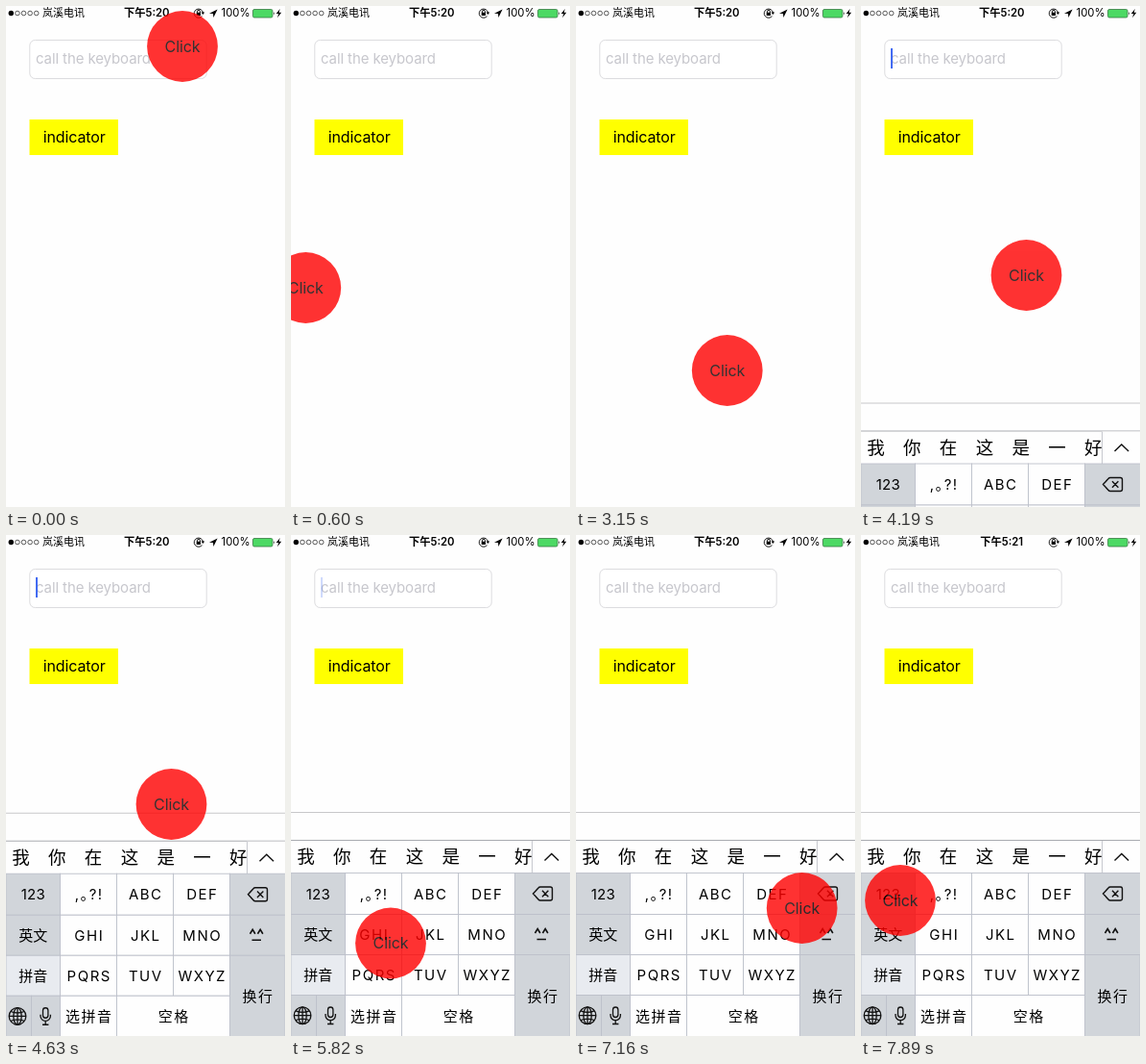
Write an HTML page that moves like this. It is 291x521 px and loops after 8000 ms.

```html
<!DOCTYPE html>
<html lang="zh-CN">
<head>
<meta charset="utf-8">
<title>Floating button</title>
<style>
html, body { margin: 0; width: 100%; height: 100%; overflow: hidden; background: #fefefe; }
svg { display: block; width: 291px; height: 521px; }
text { font-family: Inter, "Noto Sans CJK SC", "Noto Sans CJK", sans-serif; }
.icon { fill: none; stroke: #111; stroke-width: 1.4; }
.mid text { text-anchor: middle; }
</style>
</head>
<body>
<svg viewBox="0 0 291 521">
  <rect width="291" height="521" fill="#fefefe"/>

  <g id="status" font-size="11">
    <circle cx="5.3" cy="7.5" r="2.7"/>
    <text x="38" y="11.3">岚溪电讯</text>
    <text id="clock" x="146.7" y="11.3" font-size="11.3" font-weight="600" text-anchor="middle"></text>
    <path class="icon" style="stroke-width:1" d="M204.4 10.6A4.6 4.6 0 1 1 205.4 7M199.4 7V5.8a1.5 1.5 0 0 1 3 0V7"/>
    <path d="M198.7 6.8h4.2v3.2h-4.2zM203.6 6.6h3.6l-1.8 2.3zM212 7.8l8.6-4.3-4.2 8.6-.4-4.1z"/>
    <text x="254.5" y="11.4" font-size="11.3" text-anchor="end">100%</text>
    <rect x="257.5" y="3.5" width="20.5" height="8.5" rx="1.5" fill="#4cd964" stroke="#397a45" stroke-width=".8"/>
    <path d="M279 6q1.5 1.7 0 3.5zM285.8 3l-4 5h2.6l-1.4 4.2 4.3-5.4h-2.6z"/>
  </g>

  <rect x="24.8" y="35.5" width="184.4" height="40" rx="5.5" fill="#fff" stroke="#dcdcdf"/>
  <text x="31" y="60" font-size="15" letter-spacing="-.1" fill="#c7c7cd">call the keyboard</text>
  <rect id="caret" x="31" y="44" width="2" height="21" fill="#426bf2"/>
  <rect x="24.5" y="118" width="92.5" height="37" fill="#ff0"/>
  <text x="71.2" y="142" font-size="16" letter-spacing="-.1" text-anchor="middle">indicator</text>

  <g id="keyboard">
    <rect y="288" width="291" height="233" fill="#fefefe"/>
    <path d="M0 288.5H291" stroke="#c8c8ca"/>
    <path d="M0 317.5H291" stroke="#a9abb0"/>
    <g id="words" class="mid" font-size="18.5"></g>
    <rect x="251" y="318" width="40" height="34" fill="#fefefe"/>
    <path d="M251.5 318V352" stroke="#c6c8ce"/>
    <path class="icon" d="M264.5 338.5l7.3-7 7.3 7"/>
    <g id="keys" class="mid" font-size="15"></g>
    <path class="icon" d="M252.5 373l5.5-6q.8-1 2-1h10.5q2 0 2 2v10q0 2-2 2H260q-1.2 0-2-1zM262 369.8l6.4 6.4m0-6.4l-6.4 6.4"/>
    <path class="icon" style="stroke-width:1.6" d="M254.5 414l2.7-4.5 2.7 4.5m2.6 0l2.7-4.5 2.7 4.5M256.5 420.5h9.5"/>
    <g class="icon" style="stroke-width:1.3">
      <circle cx="12" cy="499.7" r="8.8"/>
      <ellipse cx="12" cy="499.7" rx="4.2" ry="8.8"/>
      <path d="M12 491V508.500M3.200 499.700H20.800M5 494.800q7 3 14 0M5 504.600q7-3 14 0"/>
      <rect x="38.5" y="491" width="5.4" height="10.5" rx="2.7"/>
      <path d="M36 498v1.500a5.200 5.200 0 0 0 10.400 0V498M41.200 505v3.500m-3.200 0h6.400"/>
    </g>
  </g>

  <g id="button" opacity=".8">
    <circle r="36.900" fill="red"/>
    <text y="5.700" font-size="16" letter-spacing="-.1" text-anchor="middle">Click</text>
  </g>
</svg>
<script>
const $ = id => document.getElementById(id);

function add(parent, tag, attrs, text = "") {
  const el = document.createElementNS("http://www.w3.org/2000/svg", tag);
  for (const name in attrs) el.setAttribute(name, attrs[name]);
  el.textContent = text;
  parent.append(el);
}

for (let i = 1; i < 5; i++)
  add($("status"), "circle", { cx: 5.3 + 6.6 * i, cy: 7.5, r: 2.3, fill: "none", stroke: "#333", "stroke-width": .8 });

[..."我你在这是一好"].forEach((word, i) =>
  add($("words"), "text", { x: 15.5 + 37.8 * i, y: 341 }, word));

const GRAY = "#d1d5da", WHITE = "#fefefe", PALE = "#e8ebf0";
const columnLeft = i => i ? 59 * i - 2.5 : 0;
const rowTop = row => Math.floor(351.6 + 42.4 * row) + .5;

function key(label, left, right, row, fill, rows = 1) {
  const y = rowTop(row), height = rowTop(row + rows) - y;
  const spacing = left ? 1.5 : .2;
  add($("keys"), "rect", { x: left, y, width: right - left, height, fill, stroke: "#bdc0cb", "stroke-width": .9 });
  add($("keys"), "text", {
    x: (left + right + spacing) / 2, y: y + height / 2 + 5.5, "letter-spacing": spacing
  }, label);
}

[["123", ",｡?!", "ABC", "DEF", ""],
 ["英文", "GHI", "JKL", "MNO", ""],
 ["拼音", "PQRS", "TUV", "WXYZ"]].forEach((labels, row) =>
  labels.forEach((label, i) => {
    const fill = label === "拼音" ? PALE : i % 4 ? WHITE : GRAY;
    key(label, columnLeft(i), columnLeft(i + 1), row, fill);
  }));
key("换行", columnLeft(4), 291, 2, GRAY, 2);
key("", 0, 26.5, 3, GRAY);
key("", 26.5, columnLeft(1), 3, GRAY);
key("选拼音", columnLeft(1), columnLeft(2), 3, WHITE);
key("空格", columnLeft(2), columnLeft(4), 3, WHITE);

const TICK = 148.8, KEYBOARD_START = 28;
const clamp = v => Math.min(1, Math.max(0, v));
const smooth = p => p * p * (3 - 2 * p);

// Drags and edge snaps: first tick, last tick, destination.
const moves = [
  [1, 4, 15.3, 293], [4, 6, 41, 294], [8, 12, 143, 478], [20, 22, 172.5, 280],
  [37, 39, 104, 424.5], [39, 40, 102, 430],
  [43, 46, 276, 389.5], [47, 51, 18, 380], [51, 53, 41, 380]
];

function buttonAt(n) {
  let x = 184, y = 42;
  for (const [start, end, toX, toY] of moves) {
    const p = smooth(clamp((n - start) / (end - start)));
    x += (toX - x) * p;
    y += (toY - y) * p;
  }
  return [x, y];
}

function draw() {
  const n = Math.floor(performance.now() % 8000 / TICK);
  const typing = n - KEYBOARD_START;
  const slide = typing < 0 ? 240 : 124.5 * .18 ** typing;
  const caret = typing < 0 ? 0 : clamp(4.4 - typing % 6.85);
  $("button").setAttribute("transform", `translate(${buttonAt(n)})`);
  $("keyboard").setAttribute("transform", `translate(0 ${slide})`);
  $("caret").setAttribute("opacity", caret);
  $("clock").textContent = n < 50 ? "下午5:20" : "下午5:21";
  requestAnimationFrame(draw);
}
draw();
</script>
</body>
</html>
```
